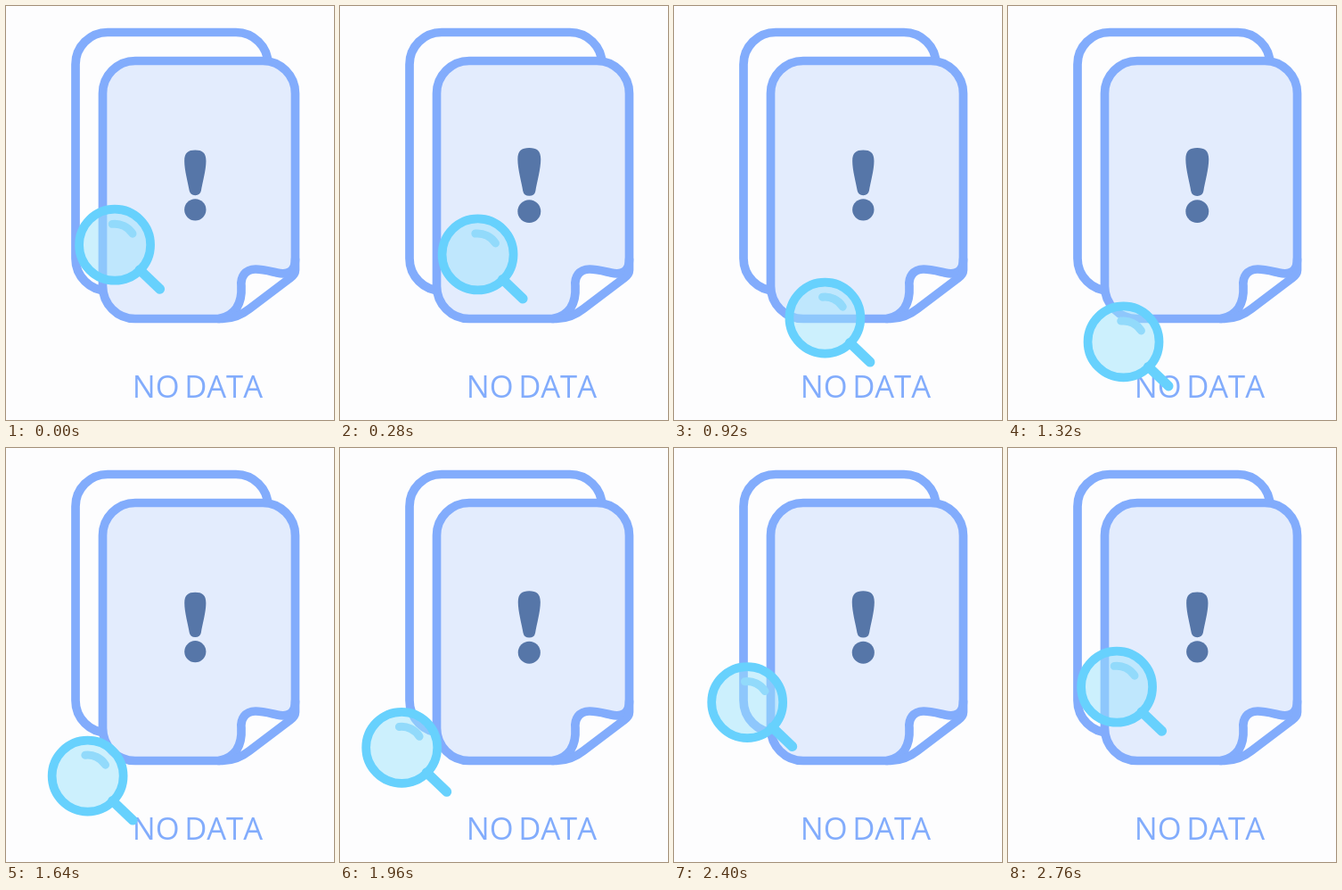
Write an HTML page with a canvas that moves like this. It is 368 by 464 pixels and loops after 2840 ms.

```html
<!DOCTYPE html>
<html lang="en">
<head>
<meta charset="utf-8">
<title>No data</title>
<style>
  html, body { margin: 0; width: 100%; height: 100%; overflow: hidden; background: #fdfdfe; }
  canvas { display: block; }
</style>
</head>
<body>
<canvas id="stage" width="368" height="464"></canvas>
<script>
const ctx = document.getElementById('stage').getContext('2d');
const LOOP = 2840, TURN = 2760, STEP = 40, TAU = Math.PI * 2;
const WHITE = '#fdfdfe', BLUE = '#82acfc', CYAN = '#67d1fd', PAPER = '#e3ecfd', INK = '#5676a8';

const backPage = new Path2D(
  'M114 319 A36 36 0 0 1 78 283 V65.5 A36 36 0 0 1 114 29.5 H258 A36 36 0 0 1 294 65');
const frontPage = new Path2D(
  'M145 61.5 H288 A36.5 36.5 0 0 1 324.5 98 V296 Q324.5 301 318 305.5 ' +
  'L273 339.5 Q259 350.5 243 350.5 H145 A36.5 36.5 0 0 1 108.5 314 V98 A36.5 36.5 0 0 1 145 61.5 Z');
const curl = 'M324.5 284 C324.5 297 317 302 304 299 C295 297 288 295 280 295 ' +
  'C268 295 263 304 264 314 C265 333 258 347 239 350.5';
const curlLine = new Path2D(curl);
const curlBack = new Path2D(curl + ' Q259 350.5 273 339.5 L318 305.5 Q324.5 301 324.5 296 Z');
const bar = new Path2D(
  'M-12 -27 C-12 -36 -8 -39 0 -39 C8 -39 12 -36 12 -27 ' +
  'C12 -17 8 -3 6.5 6 Q5.5 11 0 11 Q-5.5 11 -6.5 6 C-8 -3 -12 -17 -12 -27 Z');

function stroke(path, color = BLUE, width = 9.7) {
  ctx.strokeStyle = color;
  ctx.lineWidth = width;
  ctx.stroke(path);
}

function fill(path, color) {
  ctx.fillStyle = color;
  ctx.fill(path);
}

function circle(x, y, r, from = 0, to = TAU) {
  const path = new Path2D();
  path.arc(x, y, r, from, to);
  return path;
}

function drawPages() {
  stroke(backPage);
  fill(frontPage, PAPER);
  fill(curlBack, WHITE);
  stroke(curlLine);
  stroke(frontPage);
}

function drawMark(t) {
  const pulse = 0.5 + 0.5 * Math.cos(TAU * (t / 920 - 0.37));
  const scale = 1 + 0.083 * pulse;
  ctx.save();
  ctx.translate(212.3, 201);
  ctx.scale(scale, scale);
  fill(bar, INK);
  fill(circle(0, 27, 12), INK);
  ctx.restore();
}

function drawLabel() {
  ctx.font = '34.5px "Open Sans", "Noto Sans", sans-serif';
  ctx.fontKerning = 'none';
  ctx.wordSpacing = '-3.5px';
  ctx.fillStyle = BLUE;
  ctx.fillText('NO DATA', 141.8, 439);
}

function drawLens(t) {
  const angle = TAU * t / TURN;
  ctx.save();
  ctx.translate(122.1 + 54.6 * Math.sin(angle), 322.3 - 54.6 * Math.cos(angle));
  fill(circle(0, 0, 40), 'rgba(155, 227, 253, 0.5)');
  stroke(circle(0, 0, 23.5, -1.69, -0.56), '#92dafb', 9);
  stroke(new Path2D('M28 28 L50.5 49.5'), CYAN, 11);
  stroke(circle(0, 0, 40), CYAN);
  ctx.restore();
}

function draw(now) {
  const t = Math.min(Math.floor((now % LOOP) / STEP) * STEP, TURN);
  ctx.fillStyle = WHITE;
  ctx.fillRect(0, 0, 368, 464);
  ctx.lineCap = ctx.lineJoin = 'round';
  drawPages();
  drawMark(t);
  drawLabel();
  drawLens(t);
}

let start;
function tick(now) {
  start ??= now;
  draw(now - start);
  requestAnimationFrame(tick);
}
requestAnimationFrame(tick);
</script>
</body>
</html>
```
